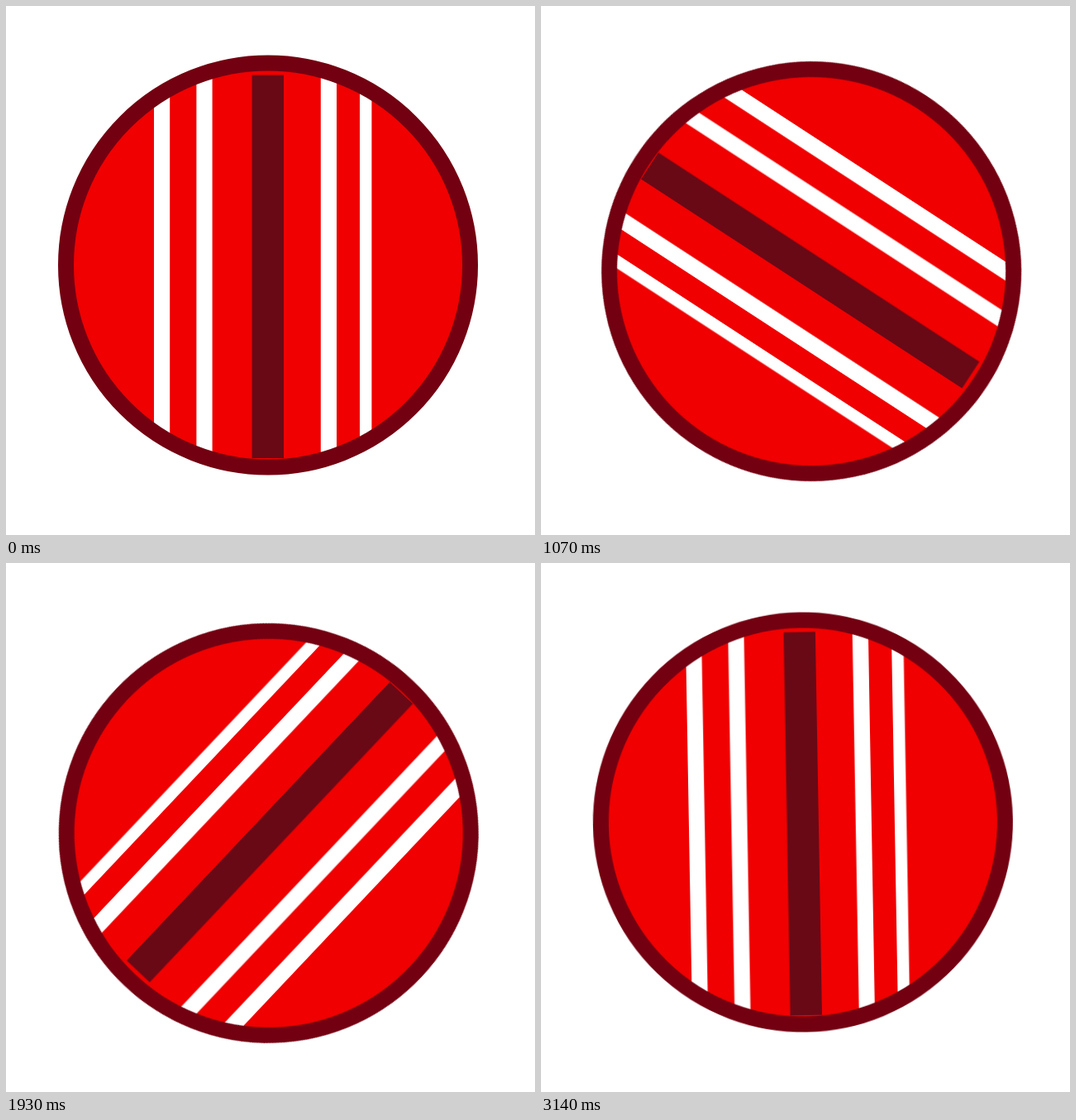
Write an HTML page without scripts that moves like this. It is 640 by 640 pixels and loops after 3210 ms.

```html
<!DOCTYPE html>
<html lang="en">
<head>
<meta charset="utf-8">
<title>Rolling ball</title>
<style>
html, body { margin: 0; width: 100%; height: 100%; overflow: hidden; background: #fff; }
svg { display: block; width: 100%; height: 100%; }

/* --d is one tick of the turn; each drawing step is two ticks, sometimes one */
.spin, .trim {
  --d: 4.5587deg;
  transform-origin: 320px 320px;
  animation: spin 3210ms -1ms infinite;
}
.trim { animation-name: trim; animation-timing-function: step-end; }

/* six steps of 70 ms, then one of 80 ms */
@keyframes spin {
  0%       { transform: rotate(0deg); animation-timing-function: steps(3); }
  6.5420%  { transform: rotate(calc(6 * var(--d))); animation-timing-function: steps(1); }
  9.0342%  { transform: rotate(calc(8 * var(--d))); animation-timing-function: steps(6); }
  22.1183% { transform: rotate(calc(20 * var(--d))); animation-timing-function: steps(1); }
  24.6105% { transform: rotate(calc(22 * var(--d))); animation-timing-function: steps(6); }
  37.6947% { transform: rotate(calc(34 * var(--d))); animation-timing-function: steps(1); }
  40.1869% { transform: rotate(calc(36 * var(--d))); animation-timing-function: steps(6); }
  53.2710% { transform: rotate(calc(48 * var(--d))); animation-timing-function: steps(1); }
  55.7632% { transform: rotate(calc(50 * var(--d))); animation-timing-function: steps(6); }
  68.8473% { transform: rotate(calc(62 * var(--d))); animation-timing-function: steps(1); }
  71.3395% { transform: rotate(calc(64 * var(--d))); animation-timing-function: steps(6); }
  84.4236% { transform: rotate(calc(76 * var(--d))); animation-timing-function: steps(1); }
  86.9158% { transform: rotate(calc(78 * var(--d))); animation-timing-function: steps(6); }
  100%     { transform: rotate(calc(90 * var(--d))); }
}

/* takes one tick back at each short step; the turn stops at 359 degrees */
@keyframes trim {
  0%       { transform: rotate(0deg); }
  11.2149% { transform: rotate(calc(-1 * var(--d))); }
  22.1183% { transform: rotate(calc(-2 * var(--d))); }
  31.1526% { transform: rotate(calc(-3 * var(--d))); }
  42.3676% { transform: rotate(calc(-4 * var(--d))); }
  53.2710% { transform: rotate(calc(-5 * var(--d))); }
  62.3052% { transform: rotate(calc(-6 * var(--d))); }
  73.5202% { transform: rotate(calc(-7 * var(--d))); }
  84.4236% { transform: rotate(calc(-8 * var(--d))); }
  93.4579% { transform: rotate(calc(-9 * var(--d))); }
  97.8193%, 100% { transform: rotate(calc(-9.25 * var(--d))); }
}
</style>
</head>
<body>
<svg viewBox="0 0 640 640">
  <clipPath id="disc"><circle cx="317" cy="313.5" r="240"/></clipPath>
  <g class="spin">
    <g class="trim">
      <circle cx="317" cy="313.5" r="240" fill="#f00000"/>
      <g clip-path="url(#disc)" fill="#fff">
        <rect x="179" y="60" width="19.2" height="508"/>
        <rect x="230.4" y="60" width="19.2" height="508"/>
        <rect x="380.8" y="60" width="19.2" height="508"/>
        <rect x="428" y="60" width="14.4" height="508"/>
      </g>
      <rect x="297.6" y="83.5" width="38.4" height="463.5" fill="#690916"/>
      <circle cx="317" cy="313.5" r="244.5" fill="none" stroke="#730011" stroke-width="19"/>
    </g>
  </g>
</svg>
</body>
</html>
```
